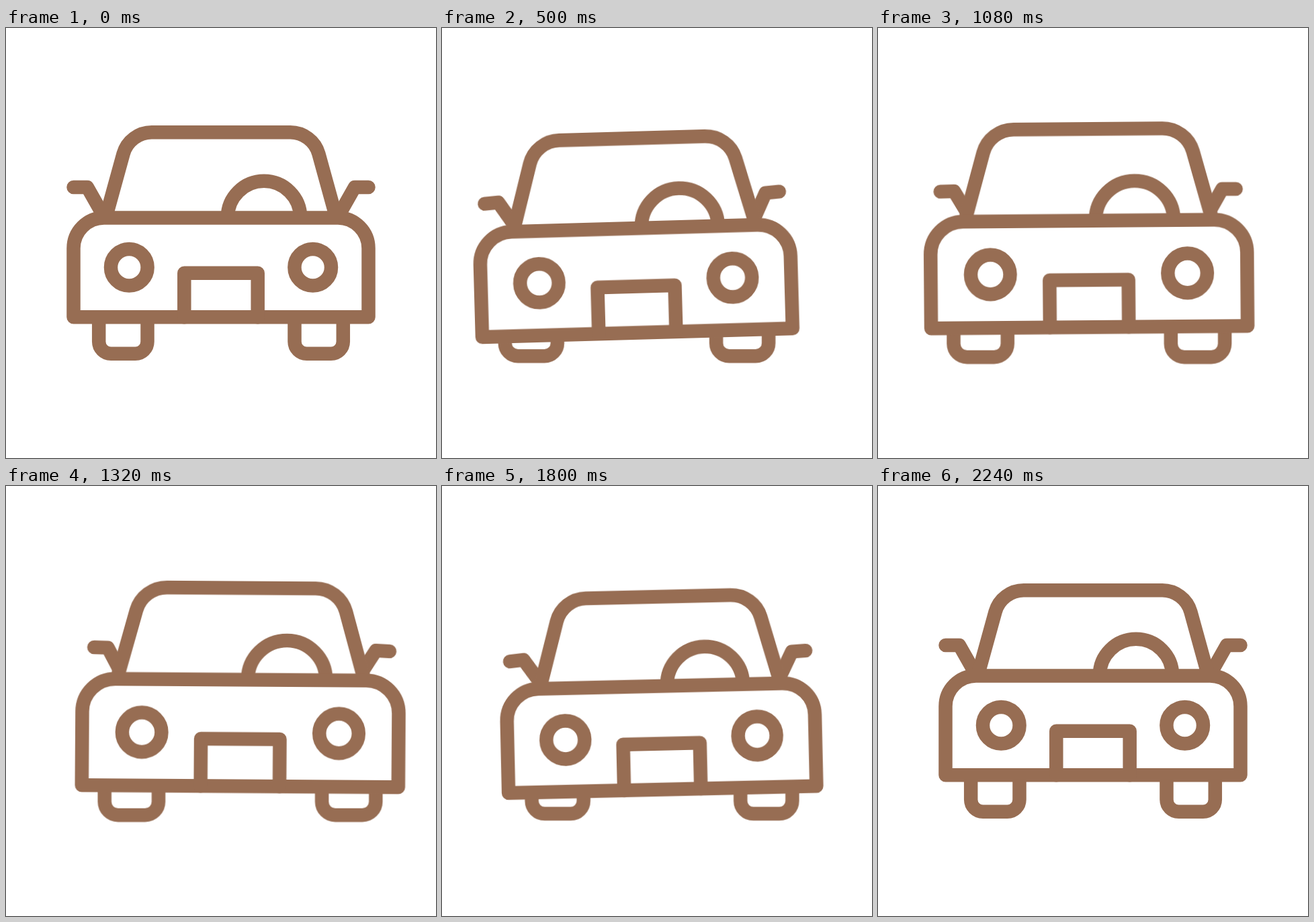
Animation, 640 px wide and 640 px high, one loop 2400 ms. Source, as an HTML page:

```html
<!DOCTYPE html>
<html lang="en">
<head>
<meta charset="utf-8">
<title>Driving car</title>
<style>
html, body { margin: 0; width: 100%; height: 100%; overflow: hidden; background: #fff; }
svg { display: block; width: 100%; height: 100%; animation: trim 2400ms step-end infinite; }
path, circle {
  fill: none; stroke: #976d53; stroke-width: 20.5px;
  stroke-linecap: round; stroke-linejoin: round; vector-effect: non-scaling-stroke;
}
.solid { fill: #fff; }

.drive, .rock, .grow, .wheels, .lift, .left, .right {
  animation: 2400ms cubic-bezier(.3333, 0, .6667, 1) infinite;
}
.drive  { animation-name: drive; }
.rock   { animation-name: rock; transform-origin: 320px 395px; }
.grow   { animation-name: grow; transform-origin: 320px 430px; --size: 1.073; }
.wheels { animation-name: grow; transform-origin: 320px 439px; --size: 1.11; }
.lift   { animation-name: lift; }
.left   { animation-name: left; transform-origin: 142px 274px; }
.right  { animation-name: right; transform-origin: 498px 274px; }

@keyframes drive {
  0%, 6.17% { transform: translateX(0); }
  31.67% { transform: translateX(-49px); }
  56.67% { transform: translateX(29.5px); }
  84%, 100% { transform: translateX(0); }
}
@keyframes rock {
  0% { transform: translateY(0) rotate(0deg); }
  10.42% { transform: translateY(4px) rotate(1deg); }
  23.96% { transform: translateY(26.2px) rotate(-2deg); }
  37.29% { transform: translateY(-5.2px) rotate(2.6deg); }
  49.58% { transform: translateY(24px) rotate(-1.8deg); }
  62.08% { transform: translateY(5.5px) rotate(3.55deg); }
  74.58% { transform: translateY(21.7px) rotate(-1.3deg); }
  90%, 100% { transform: translateY(0) rotate(0deg); }
}
@keyframes grow {
  0%, 93.33%, 100% { transform: scale(1); }
  32.08%, 61.25% { transform: scale(var(--size)); }
}
@keyframes lift {
  0%, 93.33%, 100% { transform: translateY(0); }
  32.08%, 61.25% { transform: translateY(-11px); }
}
@keyframes left {
  0%, 90%, 100% { transform: rotate(0deg); }
  10.42% { transform: rotate(2deg); }
  23.96% { transform: rotate(-5deg); }
  37.29% { transform: rotate(2.8deg); }
  49.58% { transform: rotate(-3deg); }
  62.08% { transform: rotate(8deg); }
  74.58% { transform: rotate(-5.5deg); }
}
@keyframes right {
  0%, 90%, 100% { transform: rotate(0deg); }
  10.42% { transform: rotate(2deg); }
  23.96% { transform: rotate(-5deg); }
  37.29% { transform: rotate(0deg); }
  49.58% { transform: rotate(.5deg); }
  62.08% { transform: rotate(6.5deg); }
  74.58% { transform: rotate(-3deg); }
}
/* At rest the tyres are cut flat. */
@keyframes trim {
  0%, 93.33%, 100% { clip-path: inset(0 0 22.8% 0); }
  .83% { clip-path: inset(0); }
}
</style>
</head>
<body>
<svg viewBox="0 0 640 640">
  <g class="drive">
    <g class="wheels">
      <path d="M138.2 400V466.8a18 18 0 0 0 18 18H192.5a18 18 0 0 0 18-18V400"/>
      <path d="M429.5 400V466.8a18 18 0 0 0 18 18H483.8a18 18 0 0 0 18-18V400"/>
    </g>
    <g class="rock">
      <g class="lift">
        <path class="left" d="M100.5 237H121L142 274"/>
        <path class="right" d="M539.5 237H519L498 274"/>
      </g>
      <g class="grow">
        <path class="solid" d="M148.5 282L174.6 187.2A44 44 0 0 1 217 155.3H423A44 44 0 0 1 465.4 187.2L491.5 282"/>
        <path d="M329.8 282a54.2 54.2 0 0 1 108.4 0"/>
        <path class="solid" d="M100.5 430.2V328A45.5 45.5 0 0 1 146 282.5H494A45.5 45.5 0 0 1 539.5 328V430.2Z"/>
        <path d="M265.3 430.2V364.7H374.7V430.2"/>
        <circle cx="183.3" cy="356.3" r="27.3"/>
        <circle cx="456.7" cy="356.3" r="27.3"/>
      </g>
    </g>
  </g>
</svg>
</body>
</html>
```
